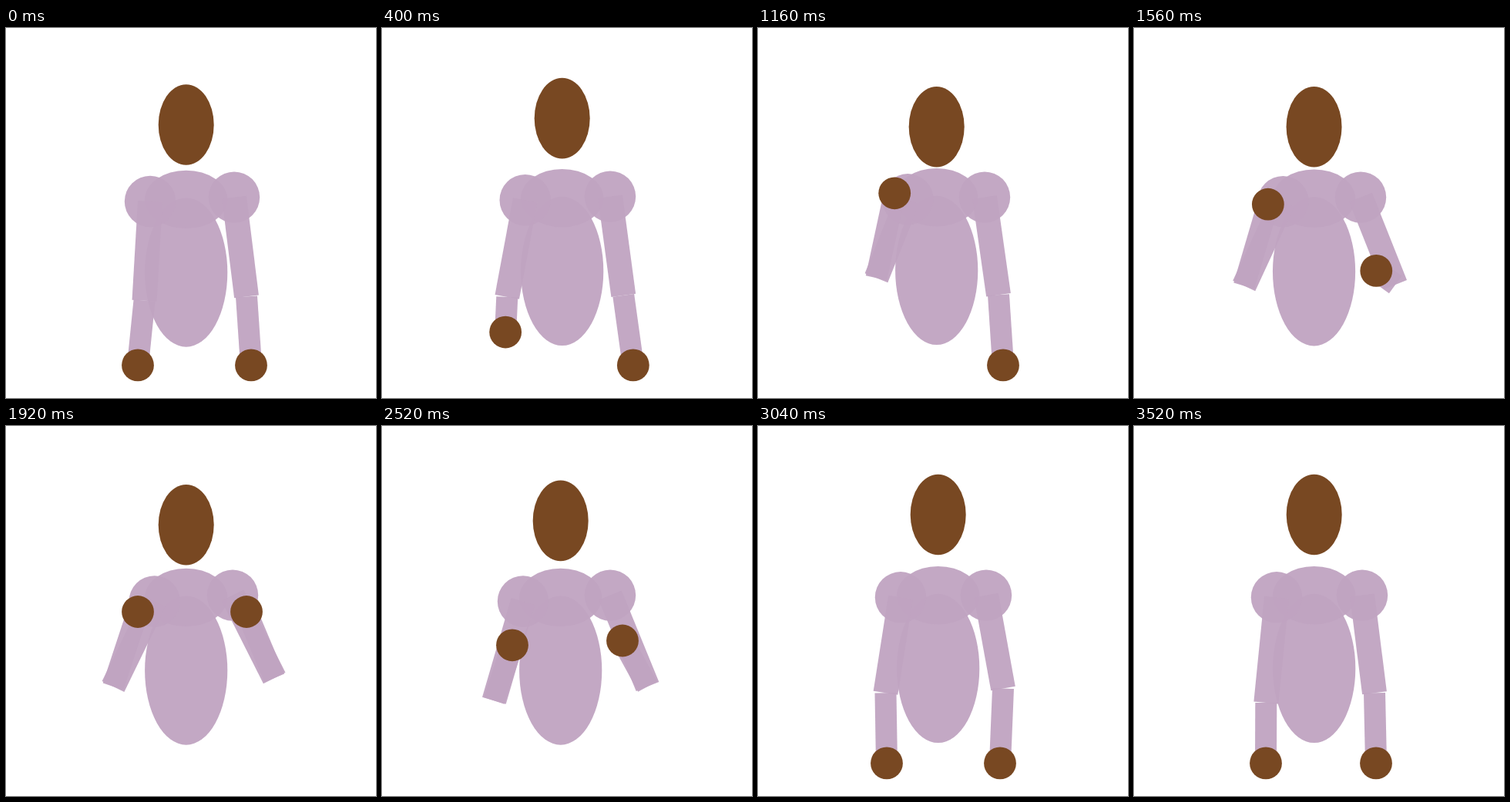
An HTML page that plays this animation: 480 by 480 pixels, repeating every 3.6 s.

```html
<!DOCTYPE html>
<html lang="en">
<head>
<meta charset="utf-8">
<title>Signing figure</title>
<style>
  html, body { margin: 0; width: 100%; height: 100%; overflow: hidden; background: #fff; }
  svg { display: block; width: 100vw; height: 100vh; }
  .cloth { fill: #c0a4c1; fill-opacity: .95; }
  .sleeve { fill: none; stroke: #c0a4c1; stroke-opacity: .95; }
  .upper { stroke-width: 32; }
  .fore { stroke-width: 28; }
  .skin { fill: #784822; }
</style>
</head>
<body>
<svg viewBox="0 0 480 480">
  <ellipse id="body" class="cloth" rx="53.6" ry="96.6"/>
  <ellipse id="chest" class="cloth" rx="53.6" ry="37.7"/>
  <ellipse id="head" class="skin" rx="36" ry="52.3"/>
</svg>
<script>
const LOOP = 3600, STEP = 40, LEAD = 120;
const REST = 437.4; // height of a lowered hand

// 0 to 1 between times a and b
function ease(t, a, b) {
  const u = Math.min(1, Math.max(0, (t - a) / (b - a)));
  return u * u * (3 - 2 * u);
}

// 0 to 1 and back, centred on mid
const bump = (t, mid, half) => ease(t, mid - half, mid) - ease(t, mid, mid + half);

// Point p carried through moves of [from, to, x, y]
function glide(t, p, ...moves) {
  for (const [a, b, x, y] of moves) {
    const u = ease(t, a, b);
    p = [p[0] + (x - p[0]) * u, p[1] + (y - p[1]) * u];
  }
  return p;
}

function pose(t) {
  const rise = ease(t, 0, 680), cross = ease(t, 680, 1160), both = ease(t, 1160, 1920);
  const lower = ease(t, 1920, 2520), drop = ease(t, 2520, 3040);

  const x = 233.7 - 2 * (bump(t, 1160, 480) + bump(t, 2520, 520));
  const breath = 1 - rise + both - drop + bump(t, 2120, 200);
  const y = 219.7 + 2.7 * breath;

  const left = {
    shoulder: [187 - 2 * rise + 9.3 * cross - 1.6 * both - 9.7 * lower + 2 * drop,
      y + 2.6 + 2.5 * (both - drop)],
    elbow: glide(t, [179.5, 353.7], [0, 680, 152.2, 346], [680, 1160, 153.5, 324.3],
      [1160, 1760, 139, 338], [1920, 2520, 145.4, 356.3], [2520, 3040, 165.5, 346.2],
      [3040, 3520, 171.3, 359]),
    hand: glide(t, [171, REST], [240, 680, 135, 294.8], [680, 1160, 177.2, 214.3],
      [1160, 1920, 171, 241], [1920, 2520, 169, 284.3], [2640, 2960, 167, REST],
      [3040, 3400, 171, REST])
  };
  const right = {
    shoulder: [296 - 2 * (cross - lower), 219.6 - 2.7 * bump(t, 680, 480)],
    elbow: glide(t, [312, 348.4], [0, 680, 314, 346], [680, 1160, 312, 346.2],
      [1280, 1760, 355.5, 325], [1760, 1920, 348.2, 327], [1920, 2520, 344.5, 338],
      [2640, 3040, 318, 340.5], [3040, 3400, 312, 346.2]),
    hand: glide(t, [318, REST], [0, 360, 326, REST], [360, 680, 322, REST],
      [680, 1160, 318, REST], [1280, 1760, 312, 241], [1920, 2520, 312, 278.5],
      [2640, 2960, 314, REST])
  };
  return {
    chest: [x, y],
    body: [x, y + 94.7],
    head: [x, 125.5 - 13.2 * rise + 16 * cross - 5.4 * ease(t, 1920, 2320) - 7.9 * drop],
    arms: [left, right]
  };
}

const svg = document.querySelector("svg");

function add(tag, cls, r) {
  const el = document.createElementNS(svg.namespaceURI, tag);
  el.setAttribute("class", cls);
  if (r) el.setAttribute("r", r);
  return svg.appendChild(el);
}

function place(el, [x, y]) {
  el.setAttribute("cx", x);
  el.setAttribute("cy", y);
}

const link = (el, a, b) => el.setAttribute("d", `M${a}L${b}`);

const limbs = [0, 1].map(() => ({
  ball: add("circle", "cloth", 33.2),
  upper: add("path", "sleeve upper"),
  fore: add("path", "sleeve fore"),
  fist: add("circle", "skin", 20.9)
}));

function draw(t) {
  const now = pose(t);
  for (const id of ["body", "chest", "head"]) place(document.getElementById(id), now[id]);
  limbs.forEach((limb, i) => {
    const { shoulder, elbow, hand } = now.arms[i];
    place(limb.ball, shoulder);
    link(limb.upper, shoulder, elbow);
    link(limb.fore, elbow, hand);
    place(limb.fist, hand);
  });
}

const start = performance.now();
function tick() {
  const t = (performance.now() - start) % LOOP;
  draw(t < LEAD ? 0 : Math.floor(t / STEP) * STEP);
  requestAnimationFrame(tick);
}
tick();
</script>
</body>
</html>
```
